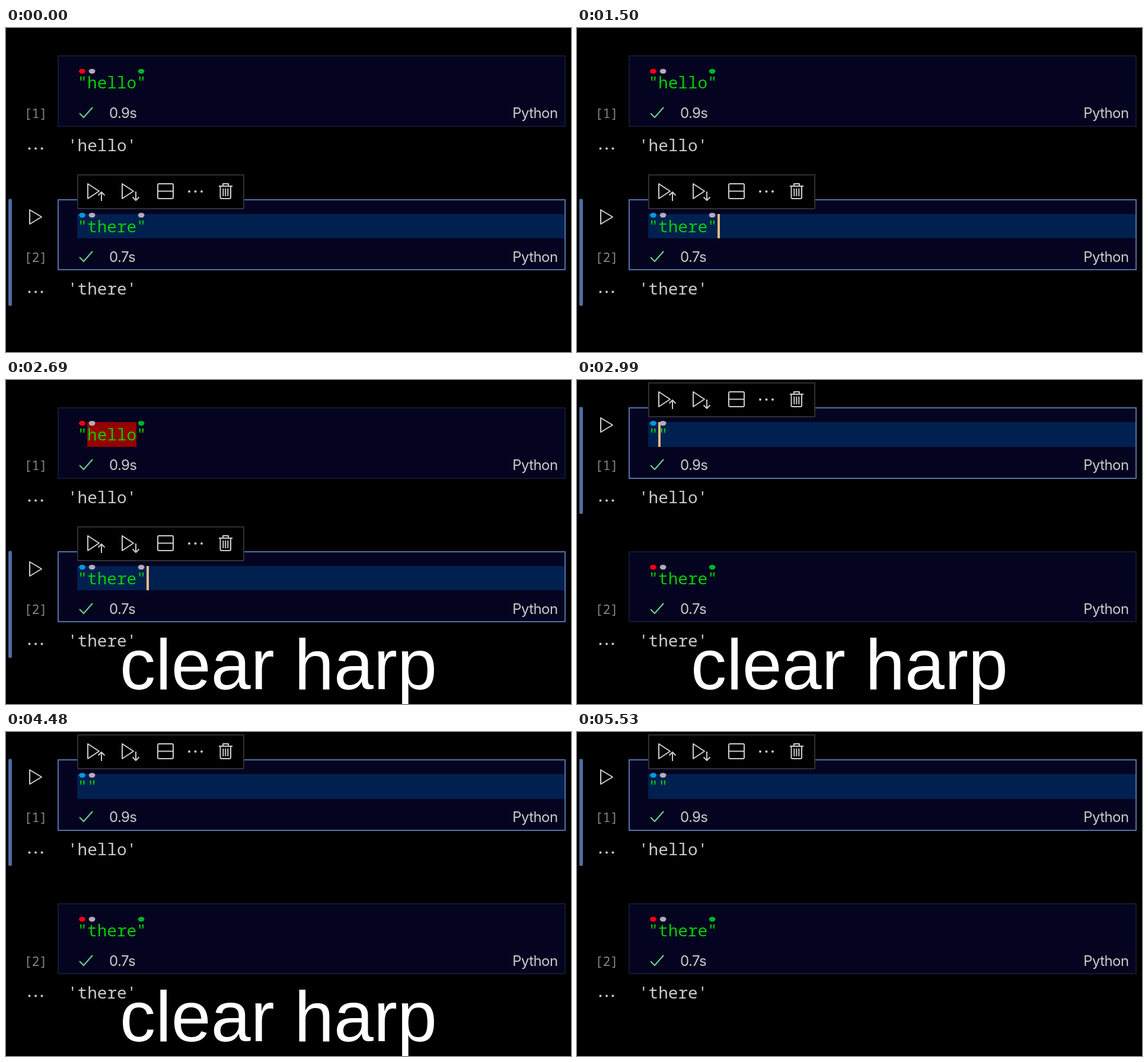
Write an HTML page that moves like this. It is 953 px wide and 547 px high and loops after 5.98 s.

```html
<!DOCTYPE html>
<html lang="en">
<head>
<meta charset="utf-8">
<title>Notebook voice command</title>
<style>
  html, body { margin: 0; width: 100%; height: 100%; overflow: hidden; background: #000; }
  svg { display: block; width: 953px; height: 547px; }
  text { white-space: pre; }
  .mono { font: 27.67px "Noto Sans Mono", monospace; fill: #ccc; }
  .code { fill: #00d000; }
  .count { font-size: 21.7px; fill: #858585; text-anchor: middle; }
  .ui { font: 24px Inter, sans-serif; letter-spacing: -.6px; fill: #ccc; }
  .end { text-anchor: end; }
  .caption { font: 120.3px "Liberation Sans", Arial, sans-serif; fill: #fff; }
  .icon { fill: none; stroke: #ccc; stroke-width: 2; stroke-linejoin: round; }
  .dots { fill: #ccc; }
  .check { fill: none; stroke: #73d68a; stroke-width: 2; }
  .before, .after, .spoken, .target, .cursor { animation: 5980ms step-end infinite; }
  .before { animation-name: before; }
  .after { animation-name: after; }
  .spoken { animation-name: spoken; }
  .target { animation-name: target; }
  .cursor { animation-name: blink; fill: #e5bd80; }
  @keyframes before { 0% { opacity: 1 } 50%, 100% { opacity: 0 } }
  @keyframes after { 0% { opacity: 0 } 50%, 100% { opacity: 1 } }
  @keyframes spoken { 0%, 79.9331%, 100% { opacity: 0 } 44.9832% { opacity: 1 } }
  @keyframes target { 0%, 50%, 100% { opacity: 0 } 44.9832% { opacity: 1 } }
  @keyframes blink {
    0%, 17.5585%, 35.117%, 57.525%, 74.9163%, 92.4749%, 100% { opacity: 0 }
    10.0334%, 25.0836%, 42.6421%, 67.5585%, 82.4414% { opacity: 1 }
  }
</style>
</head>
<body>
<svg id="stage" viewBox="0 0 953 547"></svg>
<script>
  const COLUMN = 16.6, LEFT = 120.5;
  const GREY = '#b3abb9', BLUE = '#0a96dc', RED = '#fb0007', GREEN = '#00b22b';

  const rect = (x, y, w, h, attrs) =>
    `<rect x="${x}" y="${y}" width="${w}" height="${h}" ${attrs}/>`;
  const text = (x, y, cls, value) => `<text x="${x}" y="${y}" class="${cls}">${value}</text>`;
  const path = (d, cls = 'icon') => `<path d="${d}" class="${cls}"/>`;
  const dots = (x, y, gap = 10.5) => [-gap, 0, gap]
    .map(dx => `<circle cx="${x + dx}" cy="${y}" r="2" class="dots"/>`).join('');
  const group = (cls, content) => `<g class="${cls}">${content}</g>`;
  const hat = (column, y, color) =>
    `<ellipse cx="${LEFT + (column + .5) * COLUMN - .3}" cy="${y}" rx="5.4" ry="4.1" fill="${color}"/>`;

  // Coordinates are relative to the top of the active cell.
  const toolbar = top => `<g transform="translate(0 ${top})">
    ${rect(121, -41, 280, 57, 'fill="#000" stroke="#303030" stroke-width="2"')}
    ${path('M138-26V-1L157-13.5ZM196-26V-1L215-13.5Z')}
    ${path('M161 3V-12M155.5-6.5L161-12L166.5-6.5M219-13V2M213.5-3.5L219 2L224.5-3.5')}
    ${rect(256, -26, 26, 25, 'rx="2" class="icon"')}
    ${path('M256-13.5H282')}
    ${dots(319.5, -13)}
    ${path('M359-22H382M366-22V-26H375V-22M361.5-22V-3Q361.5-1 363.5-1H377Q379-1 379-3V-22M366.3-18V-5M370.3-18V-5M374.3-18V-5')}
  </g>`;

  function cell({ top, height, label, seconds, code, output, outputY, hats, active, lineHeight, caret, target }) {
    const border = active ? '#536fa5' : '#101a31';
    const line = top + 25;
    return [
      active ? rect(4, top - .5, 6, 180.5, 'rx="2" fill="#4f6ca3"') : '',
      rect(88, top + 1, 855, height - 2, `fill="#050420" stroke="${border}" stroke-width="2"`),
      active ? rect(120, line, 822, lineHeight, 'fill="#002050"') : '',
      target ? rect(137, line, 83, 42, 'fill="#960000" class="target"') : '',
      text(LEFT, top + 55.5, 'mono code', code),
      hats.map(([column, color]) => hat(column, top + 27, color)).join(''),
      active ? rect(caret, line, 4, lineHeight, 'class="cursor"') : '',
      path(`M124 ${top + 98}L131 ${top + 105}L146 ${top + 88}`, 'check'),
      text(174, top + 106, 'ui', seconds),
      text(930.5, top + 106, 'ui end', 'Python'),
      text(50, top + 106, 'mono count', label),
      dots(50, outputY - 4),
      text(104, outputY, 'mono', output),
      active ? path(`M40 ${top + 18}V${top + 42}L60 ${top + 30}Z`) + toolbar(top) : ''
    ].join('');
  }

  const first = { top: 46, height: 121, label: '[1]', seconds: '0.9s', output: "'hello'", outputY: 207.5 };
  const second = { top: 289, height: 120, label: '[2]', seconds: '0.7s', output: "'there'", outputY: 449.5, code: '"there"' };
  const idleHats = [[0, RED], [1, GREY], [6, GREEN]];

  document.getElementById('stage').innerHTML =
    group('before',
      cell({ ...first, code: '"hello"', hats: idleHats, target: true }) +
      cell({ ...second, hats: [[0, BLUE], [1, GREY], [6, GREY]], active: true, lineHeight: 41, caret: 237 })) +
    group('after',
      cell({ ...first, code: '""', hats: [[0, BLUE], [1, GREY]], active: true, lineHeight: 42, caret: 137 }) +
      cell({ ...second, hats: idleHats })) +
    group('spoken', text(192, 522, 'caption', 'clear harp'));
</script>
</body>
</html>
```
